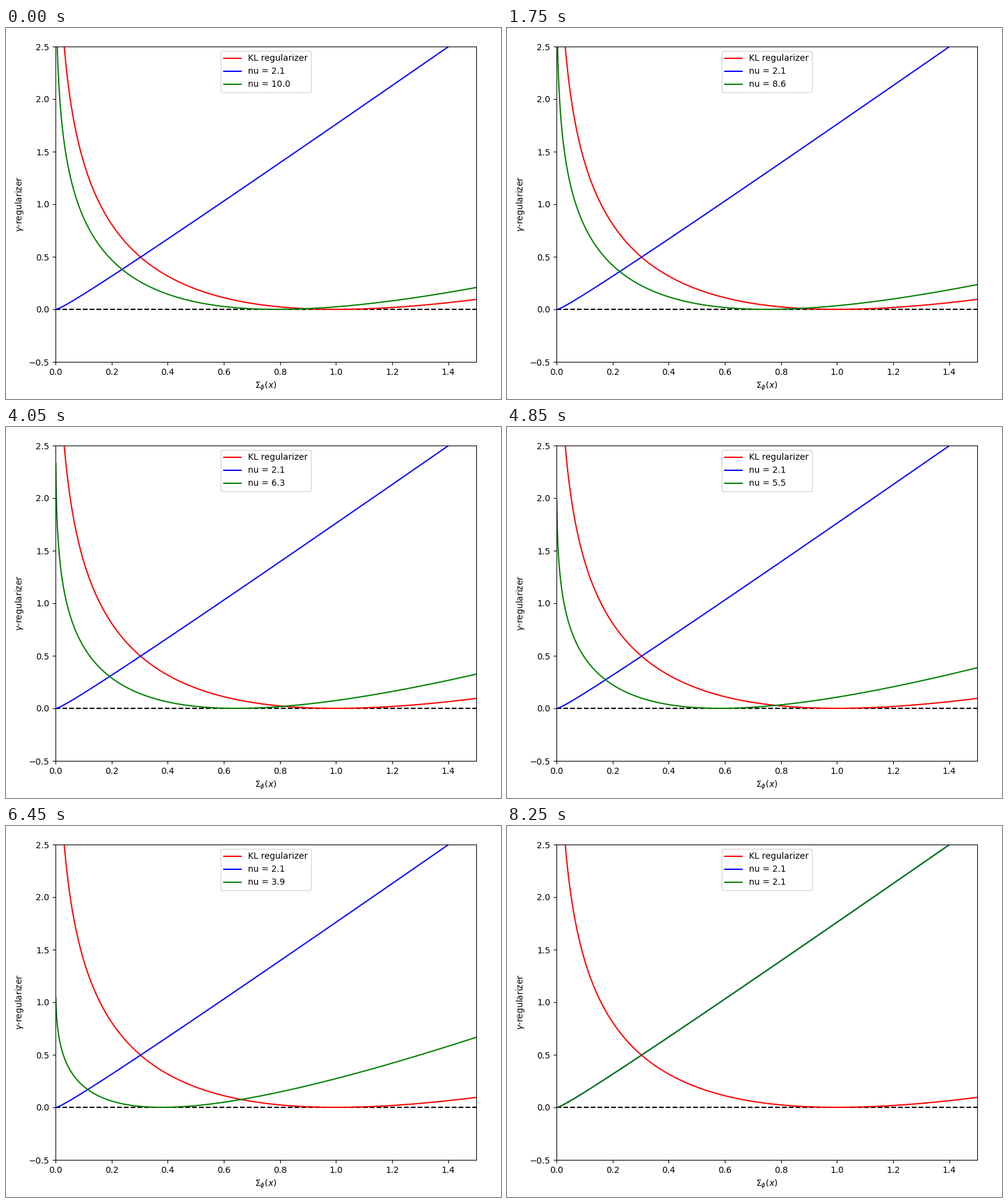
Write a matplotlib script that moves like this. It is 800 px wide and 600 px high and loops after 9600 ms.

```python
import math

import matplotlib.pyplot as plt
import numpy as np
from matplotlib.animation import FuncAnimation

LOOP_MS = 9600
TICK_MS = 50
FIRST_CHANGE_MS = 450
STEP_MS = 100
NU_START, NU_END, NU_STEP = 10.0, 2.1, 0.1
STEPS = round((NU_START - NU_END) / NU_STEP)

x = np.arange(1, 1501) / 1000


def kl_regularizer(s):
    return s - 1 - np.log(s)


def gamma_regularizer(s, nu):
    """One-dimensional Student-t regularizer, shifted so its minimum is zero."""
    density = math.gamma((nu + 1) / 2) / (math.gamma(nu / 2) * math.sqrt(nu * math.pi))
    s_min = (density * (nu - 2) / (nu - 1)) ** (2 / (nu - 1))
    scale = nu / (nu - 1)
    power = 1 / nu
    return scale * (s - nu * s_min ** (1 - power) * s ** power + (nu - 1) * s_min)


def nu_at(frame):
    elapsed = frame * TICK_MS - FIRST_CHANGE_MS
    step = min(max(elapsed // STEP_MS + 1, 0), STEPS)
    return NU_START - NU_STEP * step


def nu_label(nu):
    return f"nu = {nu:.1f}"


fig, ax = plt.subplots(figsize=(8, 6), dpi=100)
fig.subplots_adjust(left=0.1, right=0.95, bottom=0.1, top=0.95)

ax.plot([0, 1.5], [0, 0], "k--")
ax.plot(x, kl_regularizer(x), color="red", label="KL regularizer")
ax.plot(x, gamma_regularizer(x, NU_END), color="blue", label=nu_label(NU_END))
(curve,) = ax.plot(x, gamma_regularizer(x, NU_START), color="green",
                   label=nu_label(NU_START))

ax.set_xlim(0, 1.5)
ax.set_ylim(-0.5, 2.5)
ax.set_xlabel(r"$\Sigma_\phi(x)$")
ax.set_ylabel(r"$\gamma$-regularizer")
curve_text = ax.legend(loc="upper center").get_texts()[-1]


def update(frame):
    nu = nu_at(frame)
    curve.set_ydata(gamma_regularizer(x, nu))
    curve_text.set_text(nu_label(nu))
    return curve, curve_text


anim = FuncAnimation(fig, update, frames=LOOP_MS // TICK_MS, interval=TICK_MS,
                     repeat=True, repeat_delay=0)
plt.show()
```
